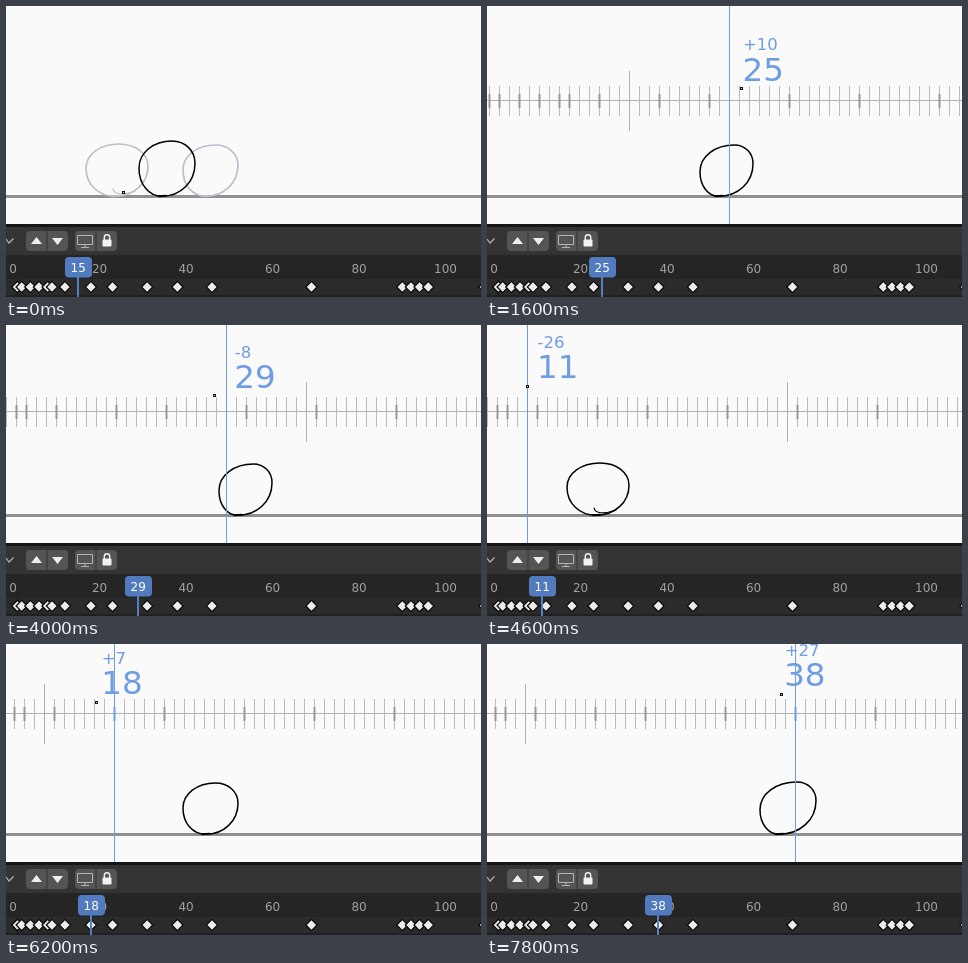
Write an HTML page with a canvas that moves like this. It is 475 px wide and 291 px high and loops after 8000 ms.

```html
<!DOCTYPE html>
<html lang="en">
<head>
<meta charset="utf-8">
<title>Timeline scrub</title>
<style>
  html, body { margin: 0; width: 100%; height: 100%; overflow: hidden; background: #fafafa; }
  canvas { display: block; }
</style>
</head>
<body>
<canvas id="stage" width="475" height="291"></canvas>
<script>
const ctx = document.getElementById('stage').getContext('2d');
const W = 475, H = 291, VIEW = 218, FLOOR = 190.3;
const LOOP = 8000, STEP = 200;
const FONT = '"DejaVu Sans", sans-serif';
const BLUE = '#6f9de3';
const GAP = 10; // overlay pixels per frame
const keys = [1, 2, 4, 6, 8, 9, 12, 18, 23, 31, 38, 46, 69, 90, 92, 94, 96, 109];

// Each ball is an oval on the floor; lean shifts its top right and its foot left
const balls = {
  9: { x: 111, r: 31, top: 138, lean: 2 },
  12: { x: 161, r: 28, top: 135, lean: 5 },
  18: { x: 204.5, r: 27.5, top: 139, lean: 5 },
  23: { x: 239.5, r: 26.5, top: 139, lean: 8 },
  31: { x: 266, r: 26, top: 142, lean: 6 },
  38: { x: 301, r: 28, top: 138, lean: 9 }
};

const smooth = u => u * u * (3 - 2 * u);
const drift = u => u ** 1.22;
const easeOut = u => 1 - (1 - u) ** 2;

// Pointer strokes, each starting where the last one ended
const origin = { x: 117, y: 186 };
const moves = [
  { start: 0, end: 1000, x: 142, y: 95 },
  { start: 1200, end: 2000, x: 365, y: 78 },
  { start: 2400, end: 3400, x: 300, y: 87 },
  { start: 3600, end: 4600, x: 40, y: 61 },
  { start: 4800, end: 5200, x: 38, y: 70 },
  { start: 5200, end: 5600, x: 38, y: 65 },
  { start: 5600, end: 7800, x: 294, y: 50, ease: drift }
];

const scrubs = [
  { start: 1000, end: 2400, frame: 15, x: 142, y: 95, lag: 18 },
  { start: 3600, end: 4800, frame: 37, x: 300, y: 87, lag: 28 },
  { start: 5200, end: LOOP, frame: 11, x: 38, y: 70, lag: 45, snap: true }
];

function pointerAt(t) {
  let { x, y } = origin;
  for (const m of moves) {
    const u = Math.min(1, Math.max(0, (t - m.start) / (m.end - m.start)));
    x += (m.x - x) * (m.ease || smooth)(u);
    y += (m.y - y) * easeOut(u);
    if (u < 1) break;
  }
  return { x, y };
}

function rect(x, y, w, h, color) {
  ctx.fillStyle = color;
  ctx.fillRect(x, y, w, h);
}

function box(x, y, w, h, r, color) {
  ctx.fillStyle = color;
  ctx.beginPath();
  ctx.roundRect(x, y, w, h, r);
  ctx.fill();
}

function trace(...points) {
  ctx.beginPath();
  points.forEach(([x, y]) => ctx.lineTo(x, y));
}

function poly(fill, ...points) {
  trace(...points);
  ctx.closePath();
  ctx.fillStyle = fill;
  ctx.fill();
}

function stroke(color, width) {
  ctx.strokeStyle = color;
  ctx.lineWidth = width;
  ctx.stroke();
}

function text(str, x, y, size, color, align = 'left') {
  ctx.font = `${size}px ${FONT}`;
  ctx.textAlign = align;
  ctx.fillStyle = color;
  ctx.fillText(str, x, y);
}

function drawBall(key, color, width) {
  const b = balls[key];
  if (!b) return;
  const mid = (b.top + FLOOR) / 2 - 3;
  const corners = [
    [b.x + b.lean, b.top], [b.x + b.r, mid - b.lean / 2],
    [b.x - b.lean, FLOOR], [b.x - b.r, mid + b.lean / 2]
  ];
  const bend = 0.57;
  ctx.lineCap = 'round';
  ctx.beginPath();
  ctx.moveTo(...corners[0]);
  corners.forEach(([x, y], i) => {
    const [nx, ny] = corners[(i + 1) % 4];
    const dx = (nx - x) * bend, dy = (ny - y) * bend;
    // Tangents are level at top and foot, upright at the sides
    if (i % 2) ctx.bezierCurveTo(x, y + dy, nx - dx, ny, nx, ny);
    else ctx.bezierCurveTo(x + dx, y, nx, ny - dy, nx, ny);
  });
  stroke(color, width);
  trace([b.x - b.lean - 3, FLOOR], [b.x - b.lean + 4, FLOOR - 0.5]);
  stroke(color, width + 0.4);
  if (key === 9) {
    ctx.beginPath();
    ctx.moveTo(107, 183);
    ctx.bezierCurveTo(108, 189, 118, 189, 129, 185);
    stroke(color, 1.2);
  }
}

function drawBalls(frame, onion) {
  const i = keys.findLastIndex(k => k <= frame);
  if (onion) {
    drawBall(keys[i - 1], '#bdc0bd', 1.7);
    drawBall(keys[i + 1], '#bfbccd', 1.7);
  }
  drawBall(keys[i], '#000', 1.5);
}

function drawOverlay(s, frame, hand) {
  const toX = f => s.x + (f - s.frame) * GAP;
  rect(0, s.y - 1, W, 1, '#b2b2b2');
  for (let f = 1; toX(f) < W; f++) rect(toX(f), s.y - 15, 1, 30, '#bababa');
  for (const k of keys) rect(toX(k) - 0.5, s.y - 7, 2, 14, k === frame ? BLUE : '#989898');
  rect(s.x, s.y - 30, 1, 60, '#b0b0b0');
  rect(toX(frame), 0, 1, VIEW, BLUE);
  const delta = frame - s.frame;
  text((delta > 0 ? '+' : '') + delta, hand.x + 10, hand.y - 38.5, 16.5, BLUE);
  text(frame, hand.x + 9.5, hand.y - 8, 32.5, BLUE);
}

function drawPointer({ x, y }) {
  x = Math.round(x);
  y = Math.round(y);
  rect(x - 1, y - 1, 3, 3, '#111');
  rect(x, y, 1, 1, '#ddd');
}

function drawHeader() {
  rect(0, VIEW, W, 3, '#161616');
  rect(0, 221, W, 28, '#343434');
  ctx.lineCap = 'butt';
  trace([0, 233], [3, 237], [7.5, 232.5]);
  stroke('#b5b5b5', 1.2);
  for (const x of [20, 69]) {
    box(x, 225, 20.5, 20, [4, 0, 0, 4], '#545454');
    box(x + 21.5, 225, 20.5, 20, [0, 4, 4, 0], '#545454');
  }
  poly('#eee', [25, 238], [30.5, 231], [36, 238]);
  poly('#eee', [46, 232], [57, 232], [51.5, 239]);
  ctx.beginPath();
  ctx.rect(71.5, 229.5, 15, 9);
  ctx.moveTo(79, 239);
  ctx.lineTo(79, 241.5);
  ctx.moveTo(75, 241.5);
  ctx.lineTo(83, 241.5);
  stroke('#b4b4b4', 1);
  ctx.beginPath();
  ctx.moveTo(98.3, 234);
  ctx.arc(101, 231.5, 2.7, Math.PI, 0);
  ctx.lineTo(103.7, 234);
  stroke('#f2f2f2', 1.4);
  box(96.5, 233.5, 9, 7, 1, '#f2f2f2');
}

function drawTimeline(frame) {
  const toX = f => 7.05 + f * 4.325;
  rect(0, 249, W, 24, '#252525');
  rect(0, 273, W, 18, '#2b2b2b');
  rect(0, 289, W, 2, '#202020');
  rect(11, 273, 1, 18, '#1b1b1b');
  for (let f = 0; f <= 100; f += 20) text(f, toX(f), 267, 12, '#a0a0a0', 'center');
  const y = 281, d = 5.6;
  for (const k of keys) {
    const x = toX(k);
    poly('#ececec', [x, y - d], [x + d, y], [x, y + d], [x - d, y]);
    stroke('#0c0c0c', 1.3);
  }
  const x = Math.round(toX(frame));
  rect(x - 1, 262, 2, 29, '#527fc5');
  box(x - 13, 251, 27, 20.5, 4, '#527bbf');
  text(frame, x + 0.2, 266, 12, '#fff', 'center');
}

function frameAt(s, x) {
  const exact = s.frame + (x - s.x) / GAP;
  const near = Math.round(exact);
  if (!s.snap || near === s.frame) return near;
  return keys.reduce((a, b) => Math.abs(b - exact) < Math.abs(a - exact) ? b : a);
}

function draw(t) {
  const s = scrubs.find(c => t < c.end);
  const active = t >= s.start;
  const hand = pointerAt(t - s.lag);
  const frame = active ? frameAt(s, hand.x) : s.frame;
  rect(0, 0, W, H, '#fafafa');
  rect(0, 189, W, 3, '#909090');
  drawBalls(frame, !active);
  if (active) drawOverlay(s, frame, hand);
  drawPointer(pointerAt(t));
  drawHeader();
  drawTimeline(frame);
}

const begin = performance.now();
function tick() {
  const t = (performance.now() - begin) % LOOP;
  draw(Math.floor(t / STEP) * STEP);
  requestAnimationFrame(tick);
}
tick();
</script>
</body>
</html>
```
